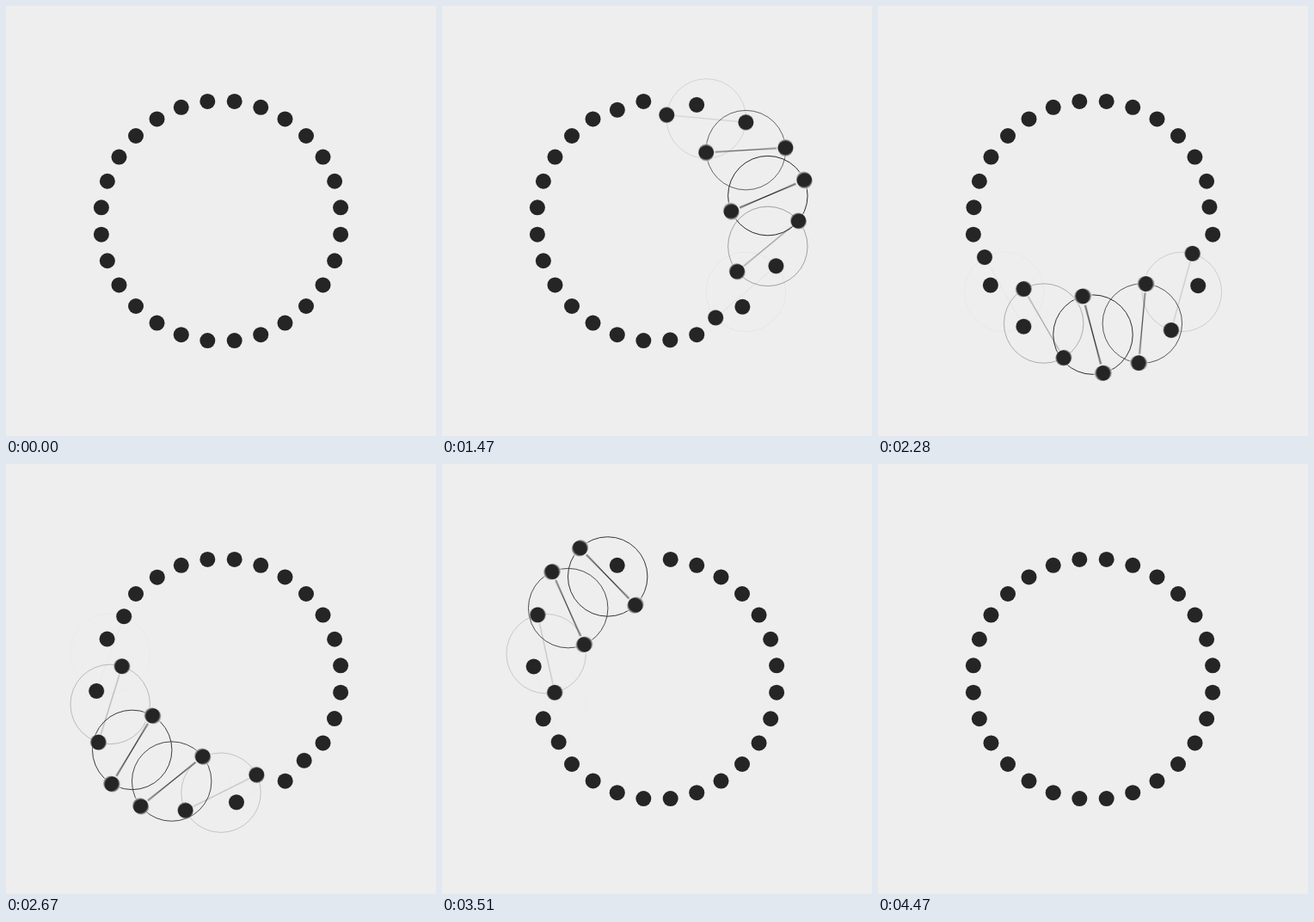
These frames come from a looping animation (500 px wide and 500 px high, 5170 ms). An HTML page with a canvas:

```html
<!DOCTYPE html>
<html lang="en">
<head>
<meta charset="utf-8">
<title>Swapping dots</title>
<style>
  html, body { margin: 0; width: 100%; height: 100%; overflow: hidden; background: #eee; }
  canvas { display: block; width: 500px; height: 500px; }
</style>
</head>
<body>
<canvas id="stage" width="500" height="500"></canvas>
<script>
const PAPER = '#eee', INK = '#252525', TAU = 2 * Math.PI;
const PAIRS = 14, RING = 140, DOT = 9, HALO = 10.8;
const SPREAD = 1.5 * TAU / 28;               // half the angle between partners
const ORBIT = RING * Math.sin(SPREAD), CENTER = RING * Math.cos(SPREAD);
const LOOP = 5170, STEP = 30, LAST = 149;    // ms, ms, final moving step
const TURN = 1800, STAGGER = 2700 / 13;      // ms
const SAMPLES = 5, SHUTTER = 18;             // motion blur, ms

const view = document.getElementById('stage').getContext('2d');
const buffer = document.createElement('canvas');
buffer.width = buffer.height = 500;
const ctx = buffer.getContext('2d');

const smooth = u => u * u * (3 - 2 * u);
const clamp = u => Math.min(1, Math.max(0, u));

function disc(x, y, r, color) {
  ctx.fillStyle = color;
  ctx.beginPath();
  ctx.arc(x, y, r, 0, TAU);
  ctx.fill();
}

function pairAt(k, time) {
  const turn = Math.PI * smooth(smooth(clamp((time - k * STAGGER) / TURN)));
  const heading = k * TAU / PAIRS, angle = heading + turn;
  return {
    x: 250 + CENTER * Math.sin(heading),
    y: 250 - CENTER * Math.cos(heading),
    dx: ORBIT * Math.cos(angle),
    dy: ORBIT * Math.sin(angle),
    alpha: Math.sin(turn) ** 2
  };
}

function drawScene(time) {
  ctx.fillStyle = PAPER;
  ctx.fillRect(0, 0, 500, 500);
  const pairs = Array.from({ length: PAIRS }, (_, k) => pairAt(k, time));
  ctx.strokeStyle = INK;
  for (const { x, y, dx, dy, alpha } of pairs) {
    ctx.globalAlpha = alpha;
    ctx.lineWidth = 1;
    ctx.beginPath();
    ctx.arc(x, y, ORBIT, 0, TAU);
    ctx.stroke();
    ctx.lineWidth = 1.3;
    ctx.beginPath();
    ctx.moveTo(x - dx, y - dy);
    ctx.lineTo(x + dx, y + dy);
    ctx.stroke();
  }
  for (const { x, y, dx, dy, alpha } of pairs) {
    for (const side of [-1, 1]) {
      const px = x + side * dx, py = y + side * dy;
      ctx.globalAlpha = alpha;
      disc(px, py, HALO, PAPER);
      ctx.globalAlpha = 1;
      disc(px, py, DOT, INK);
    }
  }
}

function render(now) {
  const time = Math.min(LAST, Math.floor(now % LOOP / STEP)) * STEP;
  for (let s = 0; s < SAMPLES; s++) {
    drawScene(time + s * SHUTTER / SAMPLES);
    view.globalAlpha = 1 / (s + 1);
    view.drawImage(buffer, 0, 0);
  }
}

const start = performance.now();
function tick() {
  render(performance.now() - start);
  requestAnimationFrame(tick);
}
tick();
</script>
</body>
</html>
```
